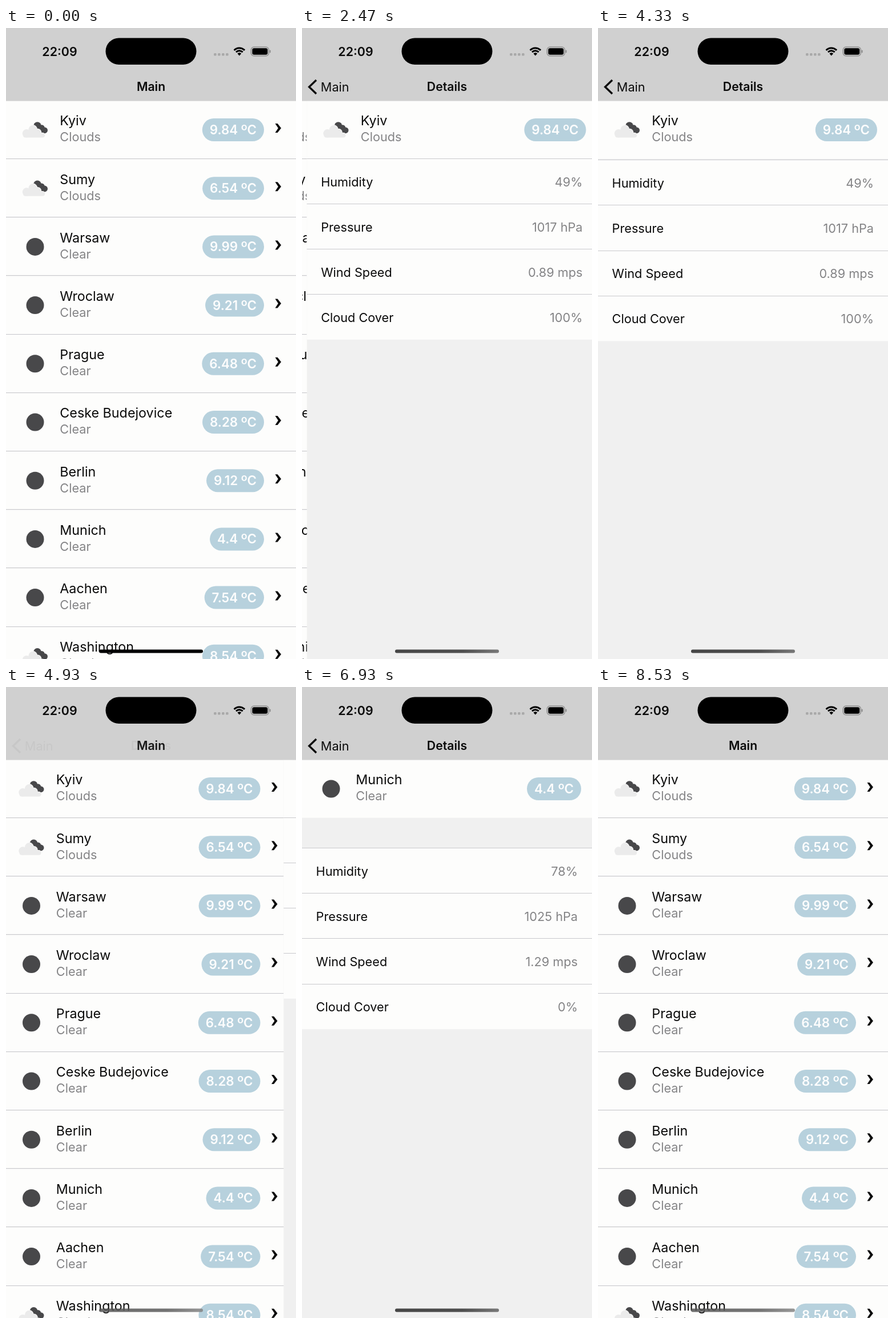
Animation of 508x1103 px, one loop 8670 ms. Source, as an HTML page with a canvas:

```html
<!DOCTYPE html>
<html lang="en">
<head>
<meta charset="utf-8">
<title>Weather list</title>
<style>
  html, body { margin: 0; width: 100%; height: 100%; overflow: hidden; background: #f0f0f0; }
  canvas { display: block; width: 508px; height: 1103px; }
</style>
</head>
<body>
<canvas id="stage" width="508" height="1103"></canvas>
<script>
const W = 508, H = 1103, LOOP = 8670, TICK = 1000 / 15;
const TOP = 127.5, ROW = 102.2, CELL = 79.1;
const FAMILY = 'Inter, "Liberation Sans", Arial, sans-serif';
const INK = '#0a0a0a', MUTED = '#848486', PAPER = '#fdfdfc', BACK = '#f0f0f0';
const LINE = '#c9c9cd', BAR = '#d0d0d0', PILL = '#b7d1dd', NIGHT = '#48484a';

const ctx = document.getElementById('stage').getContext('2d');

const cities = [
  ['Kyiv', 'Clouds', '9.84'], ['Sumy', 'Clouds', '6.54'], ['Warsaw', 'Clear', '9.99'],
  ['Wroclaw', 'Clear', '9.21'], ['Prague', 'Clear', '6.48'], ['Ceske Budejovice', 'Clear', '8.28'],
  ['Berlin', 'Clear', '9.12'], ['Munich', 'Clear', '4.4'], ['Aachen', 'Clear', '7.54'],
  ['Washington', 'Clouds', '8.54']
];
const labels = ['Humidity', 'Pressure', 'Wind Speed', 'Cloud Cover'];

// One visit per opened city; all times in ms.
const visits = [
  { city: 0, values: ['49%', '1017 hPa', '0.89 mps', '100%'],
    press: 1990, release: 2070, push: 2136, pop: 4663, end: 5280,
    pull: { from: 3040, peak: 3900, size: 50, rate: 11 } },
  { city: 7, values: ['78%', '1025 hPa', '1.29 mps', '0%'],
    press: 5725, release: 5770, push: 5817, pop: 7875, end: 8520,
    pull: { from: 6700, peak: 6950, size: 54, rate: 13 } }
];

const clamp = v => Math.min(1, Math.max(0, v));
const smooth = v => { v = clamp(v); return v * v * (3 - 2 * v); };
const inOutQuad = v => v < .5 ? 2 * v * v : 1 - 2 * (1 - v) * (1 - v);

// Critically damped decay from 1 to 0.
function decay(ms, rate) {
  if (ms <= 0) return 1;
  const u = ms / 1000 * rate;
  return (1 + u) * Math.exp(-u);
}

function openness(v, t) {
  if (t < v.push || t >= v.end) return 0;
  return t < v.pop ? 1 - decay(t - v.push, 18.26) : decay(t - v.pop, 18.26);
}

function pullOffset(p, t) {
  if (t < p.peak) return p.size * smooth((t - p.from) / (p.peak - p.from));
  const y = p.size * decay(t - p.peak, p.rate);
  return y < .4 ? 0 : y;
}

function pressAlpha(v, t) {
  if (t < v.press) return 1;
  return .2 + .8 * inOutQuad(clamp((t - v.release) / 250));
}

function text(str, x, y, size, color, weight = 400, align = 'left') {
  ctx.font = `${weight} ${size}px ${FAMILY}`;
  ctx.textAlign = align;
  ctx.fillStyle = color;
  ctx.fillText(str, x, y);
}

function rect(x, y, w, h, color) {
  ctx.fillStyle = color;
  ctx.fillRect(x, y, w, h);
}

function round(x, y, w, h, r, color) {
  ctx.fillStyle = color;
  ctx.beginPath();
  ctx.roundRect(x, y, w, h, r);
  ctx.fill();
}

function disc(x, y, r, color) {
  ctx.fillStyle = color;
  ctx.beginPath();
  ctx.arc(x, y, r, 0, 7);
  ctx.fill();
}

function poly(points, color) {
  ctx.fillStyle = color;
  ctx.beginPath();
  points.forEach(([x, y]) => ctx.lineTo(x, y));
  ctx.fill();
}

function lightCloud(grow, color) {
  disc(47, 177.5, 7.5 + grow, color);
  disc(36, 184.3, 7.2 + grow, color);
  disc(55.5, 182.5, 6 + grow, color);
  round(30 - grow, 183.5 - grow, 38 + 2 * grow, 8 + 2 * grow, 4 + grow, color);
}

function weatherIcon(kind) {
  if (kind === 'Clear') return disc(51, 178, 15.5, NIGHT);
  disc(55, 171, 6.8, NIGHT);
  disc(62.5, 174.5, 5.2, NIGHT);
  disc(67.6, 178.8, 5.4, NIGHT);
  poly([[51, 170], [62, 170], [68, 184], [62, 184]], NIGHT);
  lightCloud(.7, PAPER);
  lightCloud(0, '#ebebeb');
}

// Summary cell, drawn as if it were the first row.
function cityCell([name, sky, temp], right) {
  rect(0, TOP, W, ROW - 1, PAPER);
  weatherIcon(sky);
  text(name, 94.3, 170.3, 23.3, INK);
  text(sky, 94.3, 198.3, 21.7, MUTED);
  const label = temp + ' ºC';
  ctx.font = `600 22.3px ${FAMILY}`;
  const w = ctx.measureText(label).width + 26;
  round(right - w, 158, w, 40, 20, PILL);
  text(label, right - w / 2, 186, 22.3, '#fdfdfd', 600, 'center');
}

function mainList(pressed, alpha) {
  rect(0, TOP, W, H, BACK);
  cities.forEach((city, i) => {
    ctx.save();
    ctx.translate(0, i * ROW);
    ctx.globalAlpha = i === pressed ? alpha : 1;
    cityCell(city, 452);
    poly([[471.5, 167], [475.7, 167], [482, 175], [475.7, 183], [471.5, 183], [476.8, 175]], INK);
    ctx.restore();
    rect(0, Math.floor(228.5 + i * ROW), W, 1, LINE);
  });
}

function details(visit, offset) {
  rect(0, TOP, W, H, BACK);
  labels.forEach((label, i) => {
    const y = 228.4 + offset + i * CELL;
    rect(0, y, W, CELL, PAPER);
    rect(0, Math.floor(y), W, 1, LINE);
    text(label, 24.6, y + 48.3, 21.7, INK);
    text(visit.values[i], 483, y + 48.3, 21.7, MUTED, 400, 'right');
  });
  cityCell(cities[visit.city], 489);
  if (offset < 1) rect(0, 228, W, 1, LINE);
}

function statusBar() {
  text('22:09', 94, 48.8, 21.4, INK, 600, 'center');
  round(174.5, 17.5, 159, 46.5, 23.2, '#000');
  for (let i = 0; i < 4; i++) round(364 + i * 7, 44, 4.6, 4.6, 1.5, '#a9a9a9');

  ctx.strokeStyle = '#000';
  ctx.lineWidth = 3;
  [12.6, 7.9].forEach(r => {
    ctx.beginPath();
    ctx.arc(408.8, 47.6, r, -Math.PI * .76, -Math.PI * .24);
    ctx.stroke();
  });
  ctx.fillStyle = '#000';
  ctx.beginPath();
  ctx.moveTo(408.8, 48.5);
  ctx.arc(408.8, 47.6, 4.4, -Math.PI * .78, -Math.PI * .22);
  ctx.fill();

  ctx.strokeStyle = '#858585';
  ctx.lineWidth = 1.3;
  ctx.beginPath();
  ctx.roundRect(429.3, 33.2, 31, 15.6, 5);
  ctx.stroke();
  round(431.3, 35.2, 27, 11.6, 3.2, '#000');
  round(461.7, 38.5, 1.8, 5, 1, '#858585');
}

function header(open) {
  rect(0, 0, W, TOP, BAR);
  statusBar();
  ctx.globalAlpha = Math.pow(1 - open, 1.7);
  text('Main', W / 2, 110.3, 21.2, INK, 600, 'center');
  ctx.globalAlpha = open;
  text('Details', W / 2, 110.3, 21.2, INK, 600, 'center');
  text('Main', 32.8, 110.7, 21.7, INK);
  ctx.strokeStyle = INK;
  ctx.lineWidth = 3.4;
  ctx.beginPath();
  ctx.moveTo(25, 91);
  ctx.lineTo(12.5, 103);
  ctx.lineTo(25, 115);
  ctx.stroke();
  ctx.globalAlpha = 1;
}

function homeBar(t, open) {
  let fill = '#000';
  if (t >= 2000) {
    const base = 84 - 14 * open;
    fill = ctx.createLinearGradient(163, 1087, 345, 1092);
    [[0, base], [.65, base + 8], [1, base + 50]].forEach(([at, g]) => {
      g = Math.round(g);
      fill.addColorStop(at, `rgba(${g},${g},${g},${.85 + .15 * open})`);
    });
  }
  round(163, 1086.5, 182, 6, 3, fill);
}

function draw(t) {
  const visit = t < 5500 ? visits[0] : visits[1];
  const open = openness(visit, t);
  const x = W * (1 - open);

  ctx.save();
  ctx.translate(-.3 * W * open, 0);
  mainList(visit.city, pressAlpha(visit, t));
  ctx.restore();

  if (open > 0) {
    ctx.save();
    ctx.translate(x < .4 ? 0 : x, 0);
    details(visit, pullOffset(visit.pull, t));
    ctx.restore();
  }
  header(open);
  homeBar(t, open);
}

const start = performance.now();
function frame() {
  const t = (performance.now() - start) % LOOP;
  // The screen advances at 15 pictures per second.
  draw(Math.floor((t + 4) / TICK) * TICK + .01);
  requestAnimationFrame(frame);
}
frame();
</script>
</body>
</html>
```
